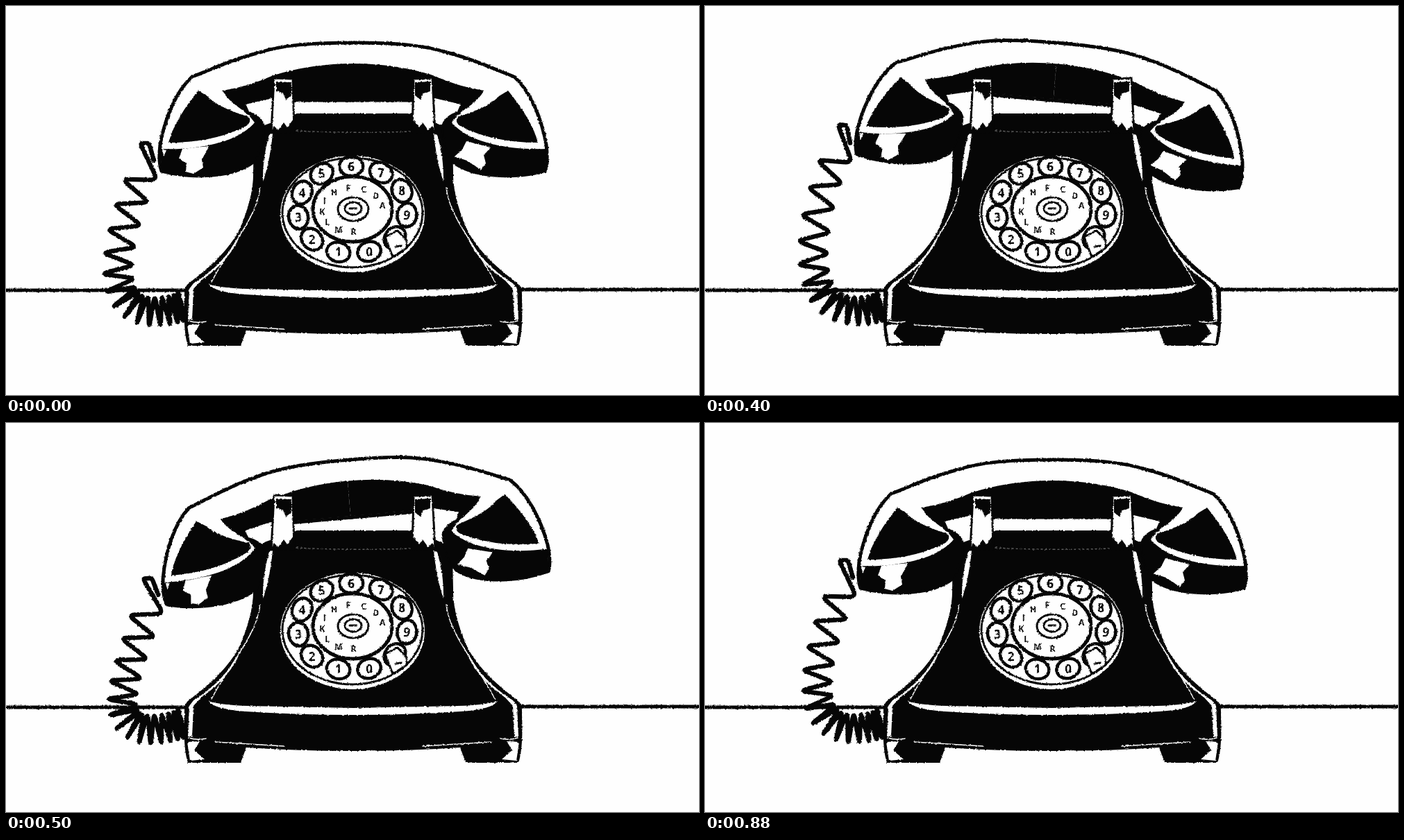
Write an HTML page that moves like this. It is 998 by 561 pixels and loops after 1 s.

```html
<!DOCTYPE html>
<html lang="en">
<head>
<meta charset="utf-8">
<title>Ringing telephone</title>
<style>
html, body { margin: 0; height: 100%; overflow: hidden; background: #fefefe; }
svg { display: block; width: 100vw; height: 100vh; }
.k { fill: #060606; }
.w { fill: #fefefe; }
.l { fill: none; stroke: #060606; stroke-width: 5; stroke-linecap: round; stroke-linejoin: round; }
.o { fill: #fefefe; }
.thin { stroke-width: 3; }
.h { fill: none; stroke: #fefefe; stroke-width: 1.5; stroke-linecap: round; }
text { font: bold 17px "Open Sans", sans-serif; fill: #060606; text-anchor: middle; dominant-baseline: central; }
.small { font-size: 12px; }
</style>
</head>
<body>
<svg viewBox="0 0 998 561">
  <defs>
    <filter id="ink" filterUnits="userSpaceOnUse" x="0" y="0" width="998" height="561" color-interpolation-filters="sRGB">
      <feTurbulence type="fractalNoise" baseFrequency=".35" numOctaves="2" seed="4"/>
      <feDisplacementMap in="SourceGraphic" scale="3" xChannelSelector="R" yChannelSelector="G"/>
    </filter>

    <!-- left halves; the right ones are mirrored -->
    <g id="base">
      <path class="k" d="M501 155H415L385 168Q362 172 357 190L356 240Q357 275 335 325C318 355 290 380 263 400Q256 405 257 420Q255 470 262 490H338L346 468Q420 473 501 473Z"/>
      <path class="w" d="M384 184Q380 225 370 253Q369 220 379 186Z"/>
      <path class="h" d="M366 262C362 305 320 350 296 398M263 454Q275 458 288 455M301 460Q350 463 400 466"/>
      <path class="w" d="M338 328Q315 372 270 400L264 408L262 452L268 453L270 408L281 396Q325 365 338 328Z"/>
      <path class="w" d="M261 460L279 459L271 472L286 485L265 487Z"/>
      <path class="w" d="M292 401Q310 407 350 408L501 411V421Q420 421 345 416Q300 413 292 401Z"/>
    </g>
    <g id="ear">
      <path class="l o" d="M501 53C440 53 400 56 365 67C325 77 295 92 268 102C246 122 229 160 222 200Q219 225 224 238C275 251 330 245 356 225Q371 200 370 172Q366 160 348 154L342 140L384 130L415 136H501"/>
      <path class="k" d="M501 83Q440 83 385 100Q350 116 312 122Q318 136 348 155L342 140L384 129L415 134H501Z"/>
      <path class="k" d="M277 122L290 130Q304 146 350 160Q354 167 346 173Q300 197 234 197Q242 165 277 122Z"/>
      <path class="k" d="M222 206C280 208 335 196 358 168L350 158Q368 160 370 172Q371 200 356 226C325 245 275 249 224 238Z"/>
    </g>
    <g id="prong">
      <path class="l o thin" d="M386 104L413 105L415 182H382Z"/>
      <path class="k" d="M389 109L411 110V129L403 135L399 126L389 123Z"/>
      <path class="k" d="M381 183L386 173L392 179L400 168L405 175L414 163L416 184Z"/>
    </g>
  </defs>

  <g filter="url(#ink)">
    <path class="l" d="M-5 410H262M738 409H1003"/>
    <use href="#base"/><use href="#base" class="mirror"/>
    <path class="h" stroke-opacity=".35" stroke-dasharray="2 4" d="M418 180Q500 184 582 181"/>

    <ellipse class="w" cx="499" cy="300" rx="104" ry="84"/>
    <ellipse class="l thin" cx="499" cy="298" rx="101" ry="79"/>
    <ellipse class="l" cx="499" cy="293" rx="57" ry="47"/>
    <g class="l thin">
      <ellipse cx="500" cy="293" rx="22" ry="17"/>
      <ellipse cx="500" cy="292" rx="12" ry="9"/>
      <path d="M495 292H505"/>
    </g>
    <g id="dial"></g>
    <path class="l o thin" d="M546 333L564 324L577 338V349L557 362Z"/>
    <path class="l thin" d="M561 347L569 346"/>

    <g id="handset">
      <use href="#ear"/><use href="#ear" class="mirror"/>
      <path class="w" d="M254 206L292 202L282 222L284 233L270 242L259 239L260 227L249 220ZM663 195L698 204L688 215L691 227L684 236L664 223L646 217L657 207ZM225 207L231 208L227 217Z"/>
    </g>
    <use href="#prong"/><use href="#prong" class="mirror"/>
    <path id="cord" class="l" style="stroke-width:6.5"/>
  </g>
</svg>
<script>
const $ = id => document.getElementById(id);
for (const el of document.querySelectorAll(".mirror"))
  el.setAttribute("transform", "translate(1000) scale(-1 1)");

// Spreads characters clockwise round an ellipse about the middle of the dial.
const ring = (chars, first, step, rx, ry, draw) => [...chars].map((c, i) => {
  const deg = first + i * step, a = deg * Math.PI / 180;
  return draw(c, 499 + rx * Math.cos(a), 294 + ry * Math.sin(a), deg);
}).join("");

$("dial").innerHTML =
  ring("123456789-0", 105, 360 / 11, 79, 63, (c, x, y, deg) =>
    `<ellipse class="l" style="stroke-width:4.5" rx="17" ry="14" transform="translate(${x} ${y}) rotate(${deg + 90})"/>
     <text x="${x}" y="${y}">${c}</text>`) +
  ring("RMLKIHFCDA", 88, 29, 44, 32, (c, x, y) => `<text class="small" x="${x}" y="${y}">${c}</text>`);

const pivot = [500, 165];
const mix = (a, b, t) => [a[0] + (b[0] - a[0]) * t, a[1] + (b[1] - a[1]) * t];

function turn([x, y], deg) {
  const a = deg * Math.PI / 180, dx = x - pivot[0], dy = y - pivot[1];
  return [pivot[0] + dx * Math.cos(a) - dy * Math.sin(a), pivot[1] + dx * Math.sin(a) + dy * Math.cos(a)];
}

// A hook on the handset, then a zigzag along a Bezier curve that tightens towards the base.
function cordPath(tilt) {
  const [a, b] = [[196, 242], [165, 320]].map(p => turn(p, tilt));
  const c = [115, 475], d = [254, 434], turns = 30, width = 24;
  const p = [[213, 223], [206, 198], [193, 198]].map(q => turn(q, tilt));
  for (let i = 0; i <= turns; i++) {
    const t = 1 - (1 - i / turns) ** 2;
    const ab = mix(a, b, t), bc = mix(b, c, t), cd = mix(c, d, t);
    const from = mix(ab, bc, t), to = mix(bc, cd, t), [x, y] = mix(from, to, t);
    const dx = to[0] - from[0], dy = to[1] - from[1];
    const side = (i % 2 ? -width : width) / Math.hypot(dx, dy);
    p.push([x + dy * side, y - dx * side]);
  }
  let path = "M" + p[0];
  for (let i = 1; i < p.length - 1; i++)
    path += "L" + mix(p[i], p[i - 1], .2) + "Q" + p[i] + " " + mix(p[i], p[i + 1], .2);
  return path + "L" + p[p.length - 1];
}

// The handset rattles from 300 to 700 ms and rests otherwise.
function tiltAt(ms) {
  const step = Math.floor(ms % 1000 / 100);
  if (step < 3 || step > 6) return 0;
  return step % 2 ? -5 : 5;
}

const start = performance.now();
let shown;
function tick() {
  const tilt = tiltAt(performance.now() - start);
  if (tilt !== shown) {
    $("handset").setAttribute("transform", `rotate(${tilt} ${pivot})`);
    $("cord").setAttribute("d", cordPath(tilt));
    shown = tilt;
  }
  requestAnimationFrame(tick);
}
tick();
</script>
</body>
</html>
```
